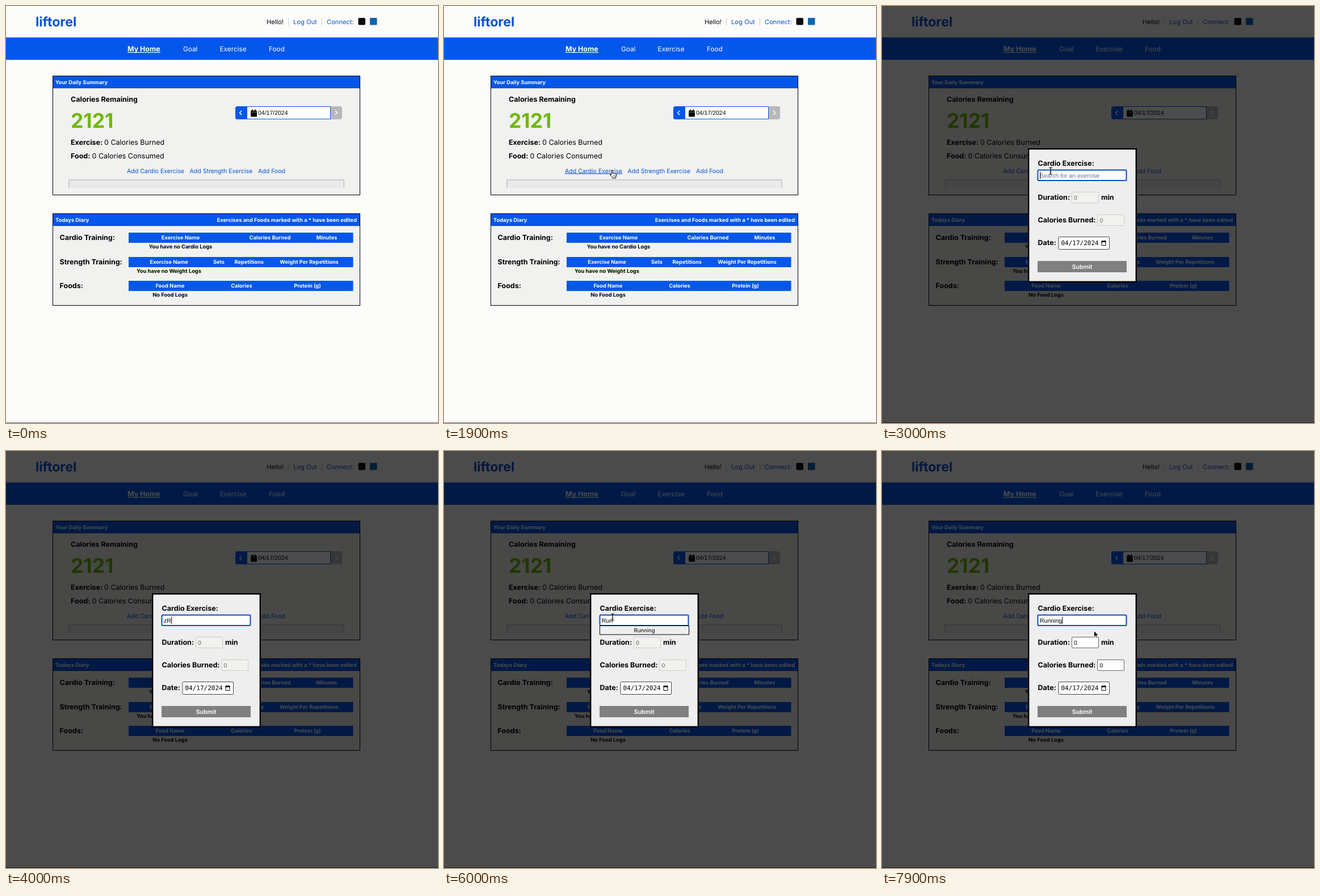
Write an HTML page that moves like this. It is 761 px wide and 736 px high and loops after 8000 ms.

```html
<!DOCTYPE html>
<html lang="en">
<head>
<meta charset="utf-8">
<title>Daily summary</title>
<style>
  html, body { margin: 0; width: 100%; height: 100%; overflow: hidden; background: #fcfcfb; }
  svg { display: block; width: 761px; height: 736px; font-family: Inter, sans-serif; font-optical-sizing: none; text-rendering: geometricPrecision; }
  .arial { font-family: "Liberation Sans", Arial, sans-serif; }
  .mono { font-family: "DejaVu Sans Mono", monospace; }
</style>
</head>
<body>
<svg id="stage" viewBox="0 0 761 736"></svg>
<script>
const BLUE = '#0357ea', LINK = '#0b52d4';
const LOOP = 8000, STEP = 100;

const rect = (x, y, w, h, fill, extra = '') =>
  `<rect x="${x}" y="${y}" width="${w}" height="${h}" fill="${fill}" ${extra}/>`;
const text = (x, y, str, size, weight = 400, fill = '#000', extra = '') =>
  `<text x="${x}" y="${y}" font-size="${size}" font-weight="${weight}" fill="${fill}" ${extra}>${str}</text>`;
const mid = 'text-anchor="middle"';
const label = (x, y, str) => text(x, y, str, 12.5, 700);
const link = (x, str, extra) => text(x, 294.5, str, 10.55, 400, LINK, extra);
const small = (x, y, str, fill = '#000', extra = mid) => text(x, y, str, 9.3, 700, fill, extra);
const field = (x, y, w, h, id) =>
  rect(x + .5, y + .5, w - 1, h - 1, '#fff', `rx="1.5" stroke="#444" id="${id}"`);

function header() {
  const nav = [[312, 'Goal'], [376.5, 'Exercise'], [463, 'Food']];
  return text(52, 36, 'liftorel', 23.2, 700, LINK) +
    text(459, 32, 'Hello!', 11.15) +
    text(506, 32, 'Log Out', 11.15, 400, LINK) +
    text(565, 32, 'Connect:', 11.15, 400, LINK) +
    rect(497, 21, 1, 14, '#ccc') + rect(556, 21, 1, 14, '#ccc') +
    rect(620.5, 21, 12.5, 12.5, '#0c0c0c', 'rx="2"') +
    rect(641, 21, 12.5, 12.5, '#0a66b2', 'rx="1"') +
    rect(0, 55.5, 761, 39.5, BLUE) +
    text(214, 80, 'My Home', 12.4, 700, '#fff') + rect(214, 81.3, 58, 1.2, '#fff') +
    nav.map(([x, s]) => text(x, 80, s, 11.8, 400, '#fff')).join('');
}

function card(y, h, title) {
  return rect(82.5, y + .5, 541, h - 1, '#f1f1f0', 'stroke="#000"') +
    rect(83, y + 1, 540, 21, BLUE) + rect(83, y + 21.5, 540, .7, '#123a80') +
    small(87, y + 14.5, title, '#fff', '');
}

function summary() {
  return card(123, 211, 'Your Daily Summary') +
    label(114, 169, 'Calories Remaining') +
    text(114, 215, '2121', 35.5, 700, '#70b800') +
    label(114, 244.5, 'Exercise:') + text(173, 244.5, '0 Calories Burned', 12.5) +
    label(114, 268.5, 'Food:') + text(151.5, 268.5, '0 Calories Consumed', 12.5) +
    link(213, 'Add Cardio Exercise', 'id="cardio"') +
    link(323.5, 'Add Strength Exercise') +
    link(444, 'Add Food') +
    rect(110, 306, 486, 15, '#e9e9e9', 'rx="3"') +
    `<path d="M110.8 320.5V308.5Q110.8 306.8 112.8 306.8H593.5Q595.3 306.8 595.3 308.5V320.5" fill="none" stroke="#c3c3c3" stroke-width="1.6"/>` +
    datePicker();
}

function datePicker() {
  return rect(404, 177, 30, 23, BLUE, 'rx="3.5"') +
    rect(560, 177, 32, 23, '#b8b8b8', 'rx="3.5"') +
    rect(424.5, 177.5, 147, 22, '#fff', `stroke="${BLUE}"`) +
    `<path d="M415.2 184.8l-3.6 3.7 3.6 3.7M580 184.8l3.6 3.7-3.6 3.7" fill="none" stroke="#fff" stroke-width="1.4"/>` +
    rect(431, 184.5, 11, 11, '#000', 'rx="1.4"') +
    rect(433, 182.5, 1.7, 3.5, '#000', 'rx=".6"') + rect(438.3, 182.5, 1.7, 3.5, '#000', 'rx=".6"') +
    rect(431, 186.8, 11, .6, '#ddd') +
    text(444, 192.3, '04/17/2024', 10.5, 400, '#000', 'class="arial"');
}

function diary() {
  const rows = [
    ['Cardio Training:', 'You have no Cardio Logs',
      [[307.5, 'Exercise Name'], [465, 'Calories Burned'], [565, 'Minutes']]],
    ['Strength Training:', 'You have no Weight Logs',
      [[287, 'Exercise Name'], [375, 'Sets'], [428.3, 'Repetitions'], [534, 'Weight Per Repetitions']]],
    ['Foods:', 'No Food Logs',
      [[289, 'Food Name'], [415, 'Calories'], [531, 'Protein (g)']]]
  ];
  return card(366, 163, 'Todays Diary') +
    small(618, 380.5, 'Exercises and Foods marked with a * have been edited', '#fff', 'text-anchor="end"') +
    rows.map(([name, empty, cols], i) => {
      const y = Math.round(400 + i * 42.7);
      return label(94.5, y + 12.5, name) + rect(216, y, 395.5, 18, BLUE) +
        cols.map(([x, s]) => small(x, y + 12.2, s, '#fff')).join('') +
        small(cols[0][0], y + 28.2, empty);
    }).join('');
}

function modal() {
  return `<g id="modal">` + rect(0, 0, 761, 736, '#000', 'opacity=".7"') +
    rect(258.2, 252.2, 189.6, 234.6, '#eeeeef', 'stroke="#000" stroke-width="2.4"') +
    label(274.5, 281.5, 'Cardio Exercise:') + field(274, 289, 157, 19.5, 'search') +
    text(278, 302.5, '', 10.5, 400, '#000', 'class="arial" id="typed"') +
    rect(0, 292.5, 1, 12.5, '#000', 'id="caret"') +
    label(274.5, 342, 'Duration:') + field(334, 328, 48, 20, 'duration') +
    text(338, 342, '0', 10.5, 400, '#000', 'class="arial num"') + label(386, 342, 'min') +
    label(274.5, 381.5, 'Calories Burned:') + field(379, 368, 48, 20, 'burned') +
    text(383.5, 381.8, '0', 10.5, 400, '#000', 'class="arial num"') +
    label(274.5, 422, 'Date:') + field(310.5, 407, 90.5, 23, 'date') +
    text(315.5, 422.3, '04/17/2024', 11, 400, '#000', 'class="mono"') +
    `<path d="M387 415.2h7v7.4h-7z" fill="none" stroke="#000" stroke-width="1"/>` +
    rect(386.5, 414.5, 8, 2.4, '#000') + rect(388, 413.6, 1, 1.5, '#000') + rect(392, 413.6, 1, 1.5, '#000') +
    rect(274, 450, 157, 20, '#808080') +
    text(352.5, 464, 'Submit', 10.5, 600, '#fff', mid) +
    `<g id="menu">` + rect(274.5, 308.5, 157, 15.5, '#eeeeef', 'stroke="#000"') +
    text(353, 320, 'Running', 9.6, 400, '#000', mid) + `</g></g>`;
}

// Pointer shapes share their hot spot at 0,0.
const pointers = {
  arrow: `<path d="M0 0V10.8L2.5 8.5 4.1 12.2 5.9 11.4 4.3 7.8H7.7Z" fill="#000" stroke="#fff" stroke-width=".8"/>`,
  hand: `<path d="M-1 1Q-1-.4 .1-.4T1.3 1V5Q2.6 4.2 3.4 5.3 4.8 4.6 5.6 5.8 7.8 5.2 7.8 7.4 7.8 10.2 6.6 11.5V13.4H.9V12Q-1.6 9.8-3.4 7.4-3.4 5.6-1 7Z" fill="#fff" stroke="#000" stroke-width="1"/><path d="M2.2 8.3v2.6M4 8.3v2.6M5.7 8.3v2.6" stroke="#000" stroke-width=".7"/>`,
  beam: `<path d="M-2.5-6Q0-6 0-4.6 0-6 2.5-6M0-4.6V4.6M-2.5 6Q0 6 0 4.6 0 6 2.5 6M-1.4 2H1.4" fill="none" stroke="#000" stroke-width="1.1"/>`
};

const stage = document.getElementById('stage');
stage.innerHTML = rect(0, 0, 761, 736, '#fcfcfb') + header() + summary() + diary() +
  rect(0, 735, 761, 1, '#6c6c6c') + modal() +
  '<g id="pointer">' + Object.entries(pointers).map(([k, s]) => `<g id="${k}">${s}</g>`).join('') + '</g>';

const el = id => document.getElementById(id);
const show = (id, on) => el(id).setAttribute('visibility', on ? 'inherit' : 'hidden');
const set = (node, attrs) => { for (const k in attrs) node.setAttribute(k, attrs[k]); };

const OPEN = 2000, FOCUS = 2800, PICK = 7500;
const typing = [[FOCUS, ''], [3500, 'z'], [3900, 'zR'], [4200, 'z'], [4300, ''], [4500, 'R'],
  [4600, 'Ru'], [4700, 'Rub'], [4800, 'Rubn'], [5100, 'Rub'], [5200, 'Ru'], [5400, 'Run'], [PICK, 'Running']];
const path = [[1000, 425, 736], [1200, 398, 620], [1400, 340, 420], [1600, 302, 304], [1700, 296, 290.5],
  [1900, 296, 290.5], [2000, 297, 290.5], [6000, 297, 293], [6300, 322, 306], [6600, 352, 320],
  [6800, 358.5, 322.5], [PICK, 358.5, 322.5], [7800, 373.5, 317.5]];

function along(t) {
  const i = path.findIndex(p => p[0] > t);
  if (i < 0) return path[path.length - 1].slice(1);
  const a = path[Math.max(i - 1, 0)], b = path[i];
  const k = Math.max(0, (t - a[0]) / (b[0] - a[0]));
  return [a[1] + (b[1] - a[1]) * k, a[2] + (b[2] - a[2]) * k];
}

function pointerShape(t, x, y) {
  if (t < OPEN) return y > 284 && y < 300 && x < 314 ? 'hand' : 'arrow';
  if (y < 308) return 'beam';
  return t < PICK ? 'hand' : 'arrow';
}

function draw(t) {
  const open = t >= OPEN, focused = t >= FOCUS, picked = t >= PICK;
  const [x, y] = along(t);
  const shape = pointerShape(t, x, y);
  show('modal', open);
  show('pointer', t >= 1000 && (t < 3500 || t >= 6000));
  set(el('pointer'), { transform: `translate(${x} ${y})` });
  for (const k in pointers) show(k, k === shape);
  el('cardio').setAttribute('text-decoration', !open && t >= 1000 && shape === 'hand' ? 'underline' : 'none');

  const [since, value] = typing.filter(s => s[0] <= t).pop() || [0, ''];
  const typed = el('typed');
  typed.textContent = value || 'Search for an exercise';
  typed.setAttribute('fill', value ? '#000' : '#707070');
  set(el('search'), { stroke: focused ? '#0a50ac' : '#222', 'stroke-width': focused ? 2 : 1 });
  set(el('caret'), { x: 278.3 + (value ? typed.getComputedTextLength() : 0) });
  show('caret', focused && (t - since) % 1000 < 500);
  show('menu', value === 'Run');

  for (const id of ['duration', 'burned'])
    set(el(id), { fill: picked ? '#fff' : '#f1f1ef', stroke: picked ? '#666' : '#cdd0bf' });
  for (const n of document.querySelectorAll('.num')) n.setAttribute('fill', picked ? '#000' : '#666');
}

const start = performance.now();
function tick() {
  const t = (performance.now() - start) % LOOP;
  draw(Math.floor(t / STEP) * STEP);
  requestAnimationFrame(tick);
}
draw(0);
requestAnimationFrame(tick);
</script>
</body>
</html>
```
